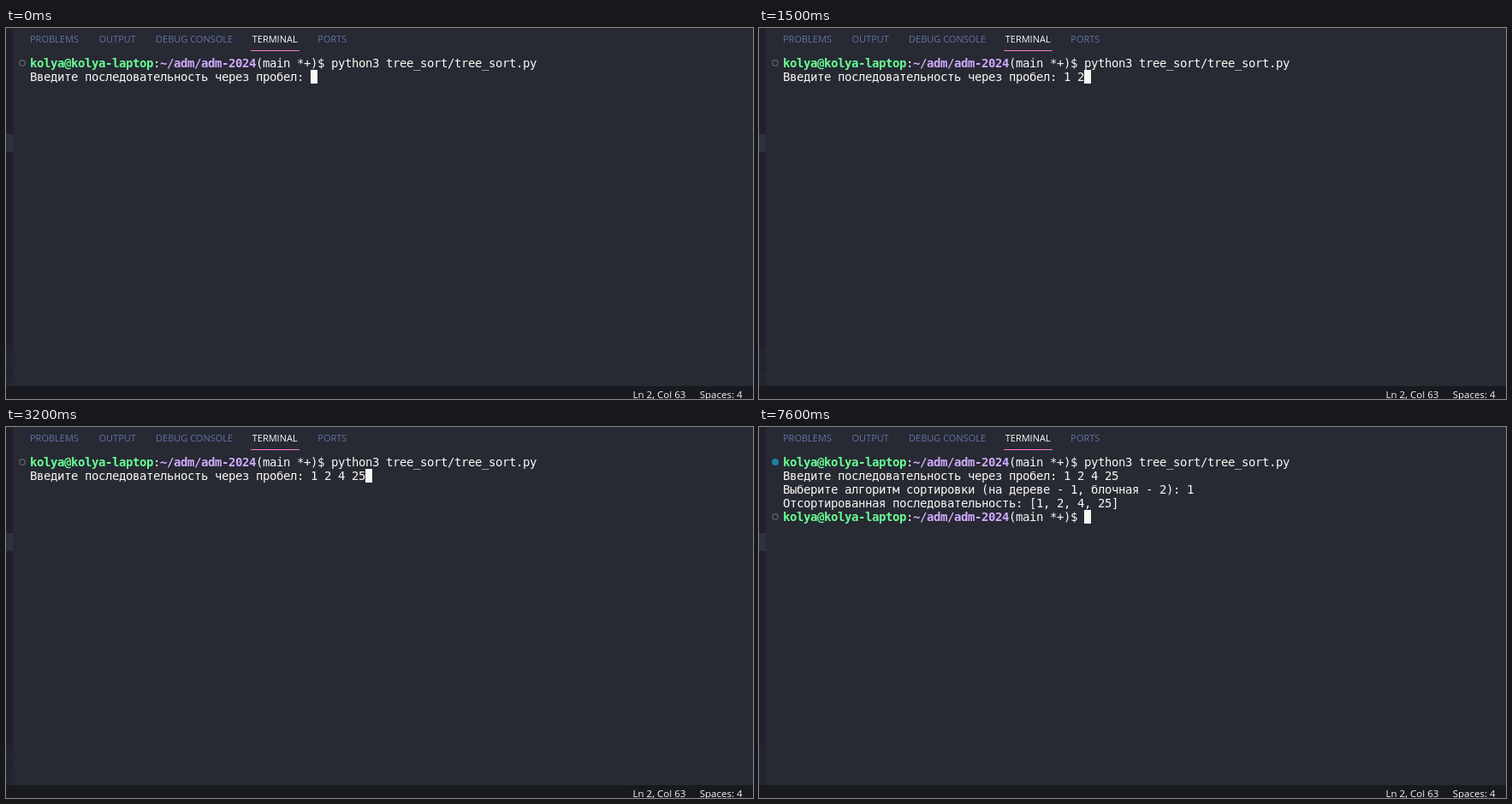
Recreate the animation shown at these times as an HTML page. Size 873 px wide and 434 px high, loop 8 s.

```html
<!DOCTYPE html>
<html lang="ru">
<head>
<meta charset="utf-8">
<title>Terminal</title>
<style>
  html, body { margin: 0; width: 100%; height: 100%; overflow: hidden; background: #272933; }
  svg { display: block; width: 100vw; height: 100vh; }
  text { white-space: pre; }
  .ui { font-family: "Open Sans", "Noto Sans", sans-serif; }
  .tab { font-size: 11px; fill: #6272a4; }
  .active { fill: #f8f8f2; }
  .status { font-size: 11.55px; fill: #f8f8f2; }
  .term { font: 14px "DejaVu Sans Mono", monospace; fill: #f8f8f2; }
  .user { font-weight: bold; fill: #69ff94; }
  .path { font-weight: bold; fill: #d0aafc; }
</style>
</head>
<body>
<svg viewBox="0 0 873 434">
  <rect width="873" height="434" fill="#272933"/>
  <rect width="8" height="372" fill="#1f2029"/>
  <rect y="372" width="8" height="47" fill="#23252e"/>
  <rect y="124" width="8" height="21" fill="#2f3140"/>
  <path d="M0 374.5H8M0 398.5H8" stroke="#1b1c24"/>
  <g class="ui tab">
    <text x="28" y="17">PROBLEMS</text>
    <text x="108.5" y="17">OUTPUT</text>
    <text x="175" y="17">DEBUG CONSOLE</text>
    <text x="287.7" y="17" class="active">TERMINAL</text>
    <text x="364.3" y="17">PORTS</text>
  </g>
  <rect x="286" y="26" width="57" height="1" fill="#ff79c6"/>
  <rect y="419" width="873" height="15" fill="#181a20"/>
  <g class="ui status">
    <text x="732.5" y="433">Ln 2, Col 63</text>
    <text x="810.7" y="433">Spaces: 4</text>
  </g>
  <g id="marks"></g>
  <rect id="cursor" width="8" height="16" fill="#f8f8f2"/>
  <g id="screen" class="term"></g>
</svg>
<script>
const LOOP = 8000, LEFT = 28, TOP = 33, CELL = 8, ROW = 16;
const NS = "http://www.w3.org/2000/svg";
const $ = id => document.getElementById(id);

const prompt = [["kolya@kolya-laptop", "user"], [":"], ["~/adm/adm-2024", "path"], ["(main *+)$ "]];
const askList = "Введите последовательность через пробел: ";
const askSort = "Выберите алгоритм сортировки (на дереве - 1, блочная - 2): ";
const result = "Отсортированная последовательность: [1, 2, 4, 25]";

// Moment of each key press
const listKeys = [[1200, "1"], [1300, " "], [1500, "2"], [1600, " "], [2100, "4"], [2200, " "], [2900, "2"], [3200, "5"]];
const sortKeys = [[6900, "1"]];
const listEnter = 3600, sortEnter = 7100, finish = 7600;

const typed = (keys, t) => keys.filter(k => k[0] <= t).map(k => k[1]).join("");

function add(parent, tag, attrs) {
  const el = document.createElementNS(NS, tag);
  for (const name in attrs) el.setAttribute(name, attrs[name]);
  parent.appendChild(el);
  return el;
}

function linesAt(t) {
  const lines = [
    [...prompt, ["python3 tree_sort/tree_sort.py"]],
    [[askList + typed(listKeys, t)]]
  ];
  if (t >= listEnter) lines.push([[askSort + typed(sortKeys, t)]]);
  if (t >= sortEnter) lines.push([[result]], t >= finish ? prompt : []);
  return lines;
}

// Draws one line on the character grid and returns its length
function drawLine(spans, row) {
  let col = 0;
  for (const [str, cls = ""] of spans) {
    const x = Array.from(str, (_, i) => LEFT + (col + i) * CELL).join(" ");
    add($("screen"), "text", { x, y: TOP + row * ROW + 13, class: cls }).textContent = str;
    col += str.length;
  }
  return col;
}

function drawMark(row, done) {
  const look = done
    ? { r: 4, fill: "#1b81a8" }
    : { r: 3.3, fill: "none", stroke: "#5b5d66", "stroke-width": 1.4 };
  add($("marks"), "circle", { cx: 19, cy: TOP + row * ROW + 8, ...look });
}

let shown = "";
function render(t) {
  const lines = linesAt(t), key = JSON.stringify(lines);
  if (key === shown) return;
  shown = key;
  $("screen").replaceChildren();
  $("marks").replaceChildren();
  const last = lines.length - 1;
  const col = lines.map(drawLine)[last];
  $("cursor").setAttribute("x", LEFT + col * CELL);
  $("cursor").setAttribute("y", TOP + last * ROW);
  drawMark(0, t >= finish);
  if (t >= finish) drawMark(last, false);
}

const start = performance.now();
function tick() {
  render((performance.now() - start) % LOOP);
  requestAnimationFrame(tick);
}
tick();
</script>
</body>
</html>
```
